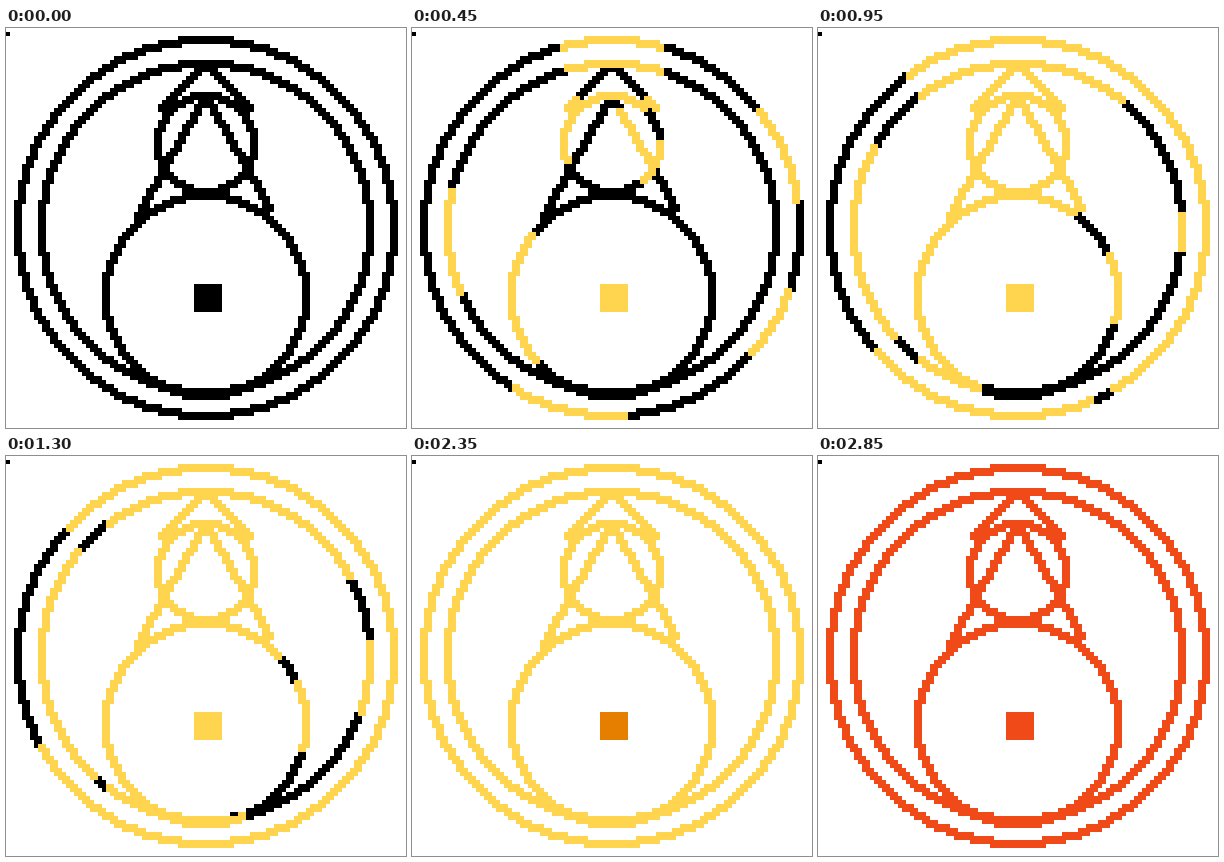
These frames come from a looping animation (400x400 px, 3250 ms). An HTML page with a canvas:

```html
<!DOCTYPE html>
<html lang="en">
<head>
<meta charset="utf-8">
<title>Alchemy circle</title>
<style>
html, body { margin: 0; width: 100%; height: 100%; overflow: hidden; background: #fff; }
canvas { display: block; width: 100vmin; height: 100vmin; image-rendering: pixelated; }
</style>
</head>
<body>
<canvas id="stage" width="400" height="400"></canvas>
<script>
const ctx = document.getElementById('stage').getContext('2d');
const CELL = 4, STEP = 50, LOOP = 3250, MID = 50;
const BLACK = '#000', YELLOW = '#ffd54f', ORANGE = '#e67e00', RED = '#f04a18';
const BEATS = [0, 450, 950, 1700, 2250];
const PAINTED = 2250, GLOW = 2350, BLAZE = 2650, WAVE = 100;

// Circle points carry their clockwise angle from the top, in degrees.
function circle(cy, r, wave, strokes) {
  const points = [];
  const add = (dx, dy) => points.push({
    x: MID + dx, y: cy + dy, at: Math.atan2(dx, -dy) * 180 / Math.PI
  });
  for (let i = 0; i <= r * Math.SQRT1_2 + 0.5; i++) {
    const j = Math.round(Math.sqrt(r * r - i * i + 0.25));
    for (const a of [-i, i]) for (const b of [-j, j]) { add(a, b); add(b, a); }
  }
  return { points, round: true, wave, strokes };
}

// Line points carry their share of the way from the apex.
function line(y, dx, dy, wave, strokes) {
  const points = [], n = Math.max(Math.abs(dx), dy);
  for (let i = 0; i <= n; i++) {
    const at = i / n;
    points.push({
      x: MID + Math.sign(dx) * Math.round(Math.abs(dx) * at), y: y + Math.round(dy * at), at
    });
  }
  return { points, wave, strokes };
}

// A stroke starts at its first value and names where its tip is on each beat.
const shapes = [
  circle(50, 47, 3, [
    [-15, 15, 51], [51, 82.5, 109], [109, 132.5, 150, 171], [212, 176, 157],
    [212, 212, 230, 255, 277], [-15, -15, -36, -60, -83]]),
  circle(50, 41, 2, [
    [-17, 18, 40, 85], [284, 246, 227, 217], [284, 284, 300, 323], [-17, -17, -37],
    [217, 217, 194, 144.4], [85, 85, 98, 124.5, 144.4]]),
  circle(67, 25, 2 - 1, [
    [309, 227.5, 203, 106], [309, 309, 396, 424], [64, 64, 106]]),
  circle(29, 12, 2, [[248, 405, 450], [90, 145, 248]]),
  line(9, -11, 11, 2, [[1, 0.75, 0]]),
  line(9, 11, 11, 2, [[1, 0.75, 0]]),
  line(17, -17, 30, 2, [[0, 0, 1]]),
  line(17, 16, 28, 2, [[0.12, 0.62, 1], [0.12, 0.12, 0]])
];

function box(x, y, w, h, color) {
  ctx.fillStyle = color;
  ctx.fillRect(x * CELL, y * CELL, w * CELL, h * CELL);
}

function trace(points, color) {
  for (const p of points) box(p.x - 1, p.y - 1, 2, 2, color);
}

function tipAt(keys, t) {
  for (let i = 1; i < keys.length; i++) {
    if (t < BEATS[i]) {
      const share = (t - BEATS[i - 1]) / (BEATS[i] - BEATS[i - 1]);
      return keys[i - 1] + (keys[i] - keys[i - 1]) * share;
    }
  }
  return keys[keys.length - 1];
}

function covered({ round, strokes }, at, t) {
  return strokes.some(keys => {
    const tip = tipAt(keys, t);
    const low = Math.min(keys[0], tip), size = Math.abs(tip - keys[0]);
    const off = round ? (at - low + 720) % 360 : at - low;
    return size > 0 && off >= 0 && off <= size;
  });
}

// Orange and then red spread outwards from the square in waves.
function waveColor(wave, t) {
  if (t >= BLAZE + WAVE * Math.ceil(wave / 2)) return RED;
  return t >= GLOW + WAVE * wave ? ORANGE : YELLOW;
}

function draw(time) {
  const t = Math.floor(time / STEP) * STEP;
  box(0, 0, 100, 100, '#fff');
  box(0, 1, 1, 1, BLACK);

  for (const s of shapes) trace(s.points, BLACK);
  for (const s of shapes) {
    const points = t < PAINTED ? s.points.filter(p => covered(s, p.at, t)) : s.points;
    trace(points, waveColor(s.wave, t));
  }

  box(47, 64, 7, 7, BLACK);
  box(47, 64, 7, Math.min(7, t / STEP), waveColor(0, t));
}

function tick(now) {
  draw(now % LOOP);
  requestAnimationFrame(tick);
}
draw(0);
requestAnimationFrame(tick);
</script>
</body>
</html>
```
